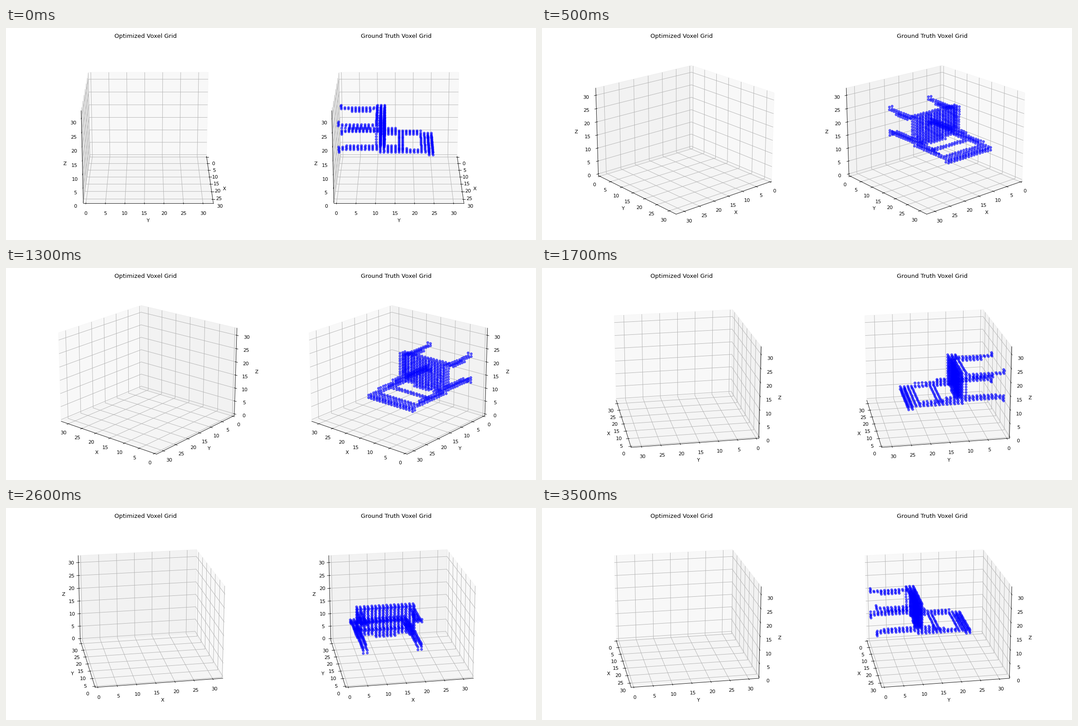
Animation, 1183 px wide and 473 px high, one loop 3600 ms. Source, as a matplotlib script:

```python
from itertools import product

import matplotlib.pyplot as plt
from matplotlib.animation import FuncAnimation

DPI = 78.87
WIDTH, HEIGHT = 1183, 473
FRAMES, INTERVAL = 36, 100
LIMITS = (-2 / 3, 32 + 2 / 3)
OUTER = (4, 19)
POSTS = (4, 5, 18, 19)
SPAN = range(4, 20)


def chair_voxels():
    """Chair lying on its back: legs towards y = 0, backrest towards y = 25."""
    cells = set()

    def fill(xs, ys, zs):
        cells.update(product(xs, ys, zs))

    # upper legs
    fill(POSTS, [0], (21, 22))
    fill(POSTS, range(1, 11), [21])
    fill(POSTS, range(3, 9), [20])

    # lower legs
    fill(POSTS, [0], (11, 12))
    fill(POSTS, range(1, 11), [12])
    fill(OUTER, range(0, 2), [13])
    fill(POSTS, range(2, 11), [13])

    # seat
    fill(SPAN, (11, 12), range(12, 23))
    fill(range(9, 15), (11, 12), [11])
    fill(OUTER, [10], range(12, 23))
    fill(SPAN, [10], [22])

    # backrest rails
    fill(POSTS, range(11, 24), [11])
    fill(POSTS, range(13, 16), [13])
    fill(POSTS, range(13, 19), [12])
    fill((4, 5, 19), range(19, 22), [12])
    fill([4], [22], [12])

    # backrest crossbars
    fill(SPAN, (16, 17), [11])
    fill(SPAN, range(22, 26), [11])
    fill(SPAN, (24, 25), [10])
    return sorted(cells)


def add_grid(position, title):
    ax = fig.add_subplot(1, 2, position, projection="3d")
    ax.set(title=title, xlabel="X", ylabel="Y", zlabel="Z",
           xlim=LIMITS, ylim=LIMITS, zlim=LIMITS)
    return ax


# the small excess keeps the pixel size from rounding down
fig = plt.figure(figsize=((WIDTH + 0.001) / DPI, (HEIGHT + 0.001) / DPI), dpi=DPI)
axes = [add_grid(1, "Optimized Voxel Grid"),
        add_grid(2, "Ground Truth Voxel Grid")]
axes[1].scatter(*zip(*chair_voxels()), c="blue", marker="o", s=20,
                alpha=0.6, depthshade=False)
for ax in axes:
    ax.set(xlim=LIMITS, ylim=LIMITS, zlim=LIMITS)
fig.tight_layout()


def update(frame):
    for ax in axes:
        ax.view_init(elev=20, azim=frame * 360 / FRAMES)
    return axes


anim = FuncAnimation(fig, update, frames=FRAMES, interval=INTERVAL,
                     repeat=True, repeat_delay=0)
plt.show()
```
